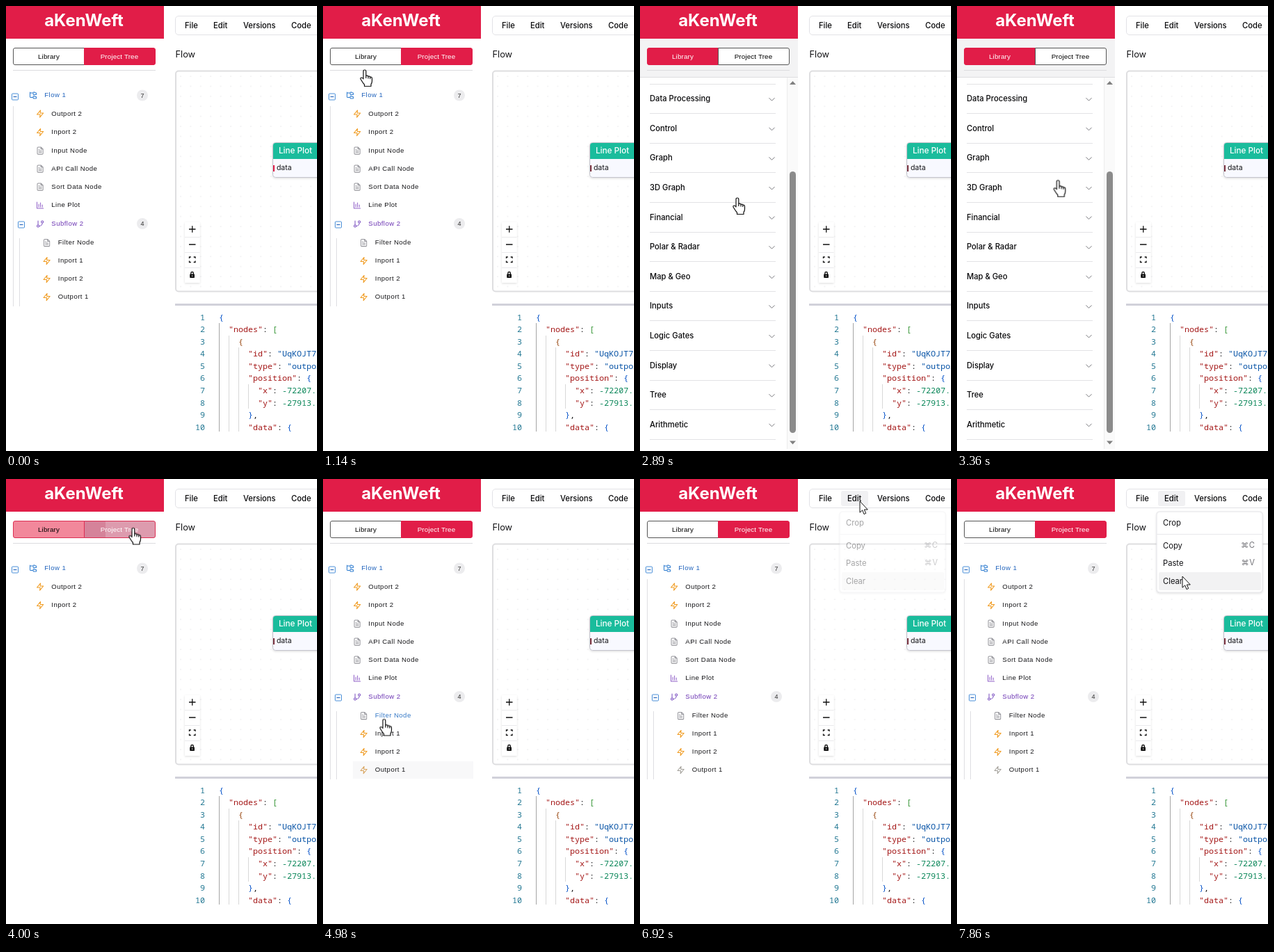
Recreate the animation shown at these times as an HTML page. Size 447x640 px, loop 8000 ms.

```html
<!DOCTYPE html>
<html lang="en">
<head>
<meta charset="utf-8">
<title>Flow editor</title>
<style>
html, body { margin: 0; width: 100%; height: 100%; overflow: hidden; background: #fff; }
svg { display: block; width: 447px; height: 640px; }
text { font: 400 11.2px Inter, sans-serif; fill: #111114; white-space: pre; }
.title { font-size: 24px; font-weight: 700; fill: #fff; text-anchor: middle; }
.head { font-size: 16px; font-weight: 600; fill: #09090b; text-anchor: middle; }
.mid { font-weight: 500; fill: #09090b; }
.hint { fill: #75757a; }
.tab { font: 9.8px "Liberation Sans", Arial, sans-serif; letter-spacing: .15px; text-anchor: middle; fill: #000; }
.row { font: 9.6px "Liberation Sans", Arial, sans-serif; letter-spacing: .45px; fill: #17171a; }
.badge { font: 9px "Liberation Sans", Arial, sans-serif; text-anchor: middle; fill: #333; }
.code { font: 500 11.67px "Noto Sans Mono", "DejaVu Sans Mono", monospace; }
.num { fill: #237893; text-anchor: end; }
.key { fill: #a31515; } .str { fill: #0451a5; } .val { fill: #098658; }
.br0 { fill: #0451c8; } .br1 { fill: #319331; } .br2 { fill: #9a4a14; }
.icon { fill: none; stroke-width: 2; stroke-linecap: round; stroke-linejoin: round; }
.short { fill: #77777c; text-anchor: end; letter-spacing: .6px; }

.a { animation: 8s linear infinite; }
.s { animation: 8s step-end infinite; }
#cursor { animation-name: move; }
#hand { animation-name: hand; }
#arrow { animation-name: arrow; }
#lib, #shade { animation-name: lib; }
#scroll { animation-name: scroll; }
#thumb { animation-name: thumb; }
#tab1 { animation-name: tab1; }
#tab2 { animation-name: tab2; }
#label1 { animation-name: label1; }
#label2 { animation-name: label2; }
#wave1 { animation-name: wave1; }
#wave2 { animation-name: wave2; }
#guides { animation-name: guides; }
#cover { animation-name: cover; }
#port { animation-name: port; }
#glow { animation-name: glow; }
#edit { animation-name: edit; }
#menu { animation-name: menu; }
.hoverFilter { animation-name: hoverFilter; }
.hoverCall { animation-name: hoverCall; }
.dim { animation-name: dim; }

@keyframes move {
  0%, 4.87% { transform: translate(150px, 640px); }
  9% { transform: translate(112px, 330px); }
  14.25% { transform: translate(60px, 92px); }
  15% { transform: translate(58px, 88px); }
  21.5%, 24.8% { transform: translate(53px, 75px); }
  27.5% { transform: translate(100px, 180px); }
  30.25%, 41.1% { transform: translate(140px, 276px); }
  48.5%, 51% { transform: translate(183px, 70.5px); }
  54.5% { transform: translate(220px, 260px); }
  58% { transform: translate(260px, 426px); }
  61% { transform: translate(112px, 418px); }
  62.2%, 63% { transform: translate(88px, 345.5px); }
  65% { transform: translate(68px, 475px); }
  67% { transform: translate(13px, 560px); }
  69% { transform: translate(100px, 596px); }
  71.75%, 74.25% { transform: translate(175px, 513px); }
  75.1% { transform: translate(160px, 235px); }
  75.85%, 76.7% { transform: translate(211px, 183.5px); }
  80% { transform: translate(285px, 75px); }
  83.75%, 91.6% { transform: translate(316px, 32px); }
  94.9%, 96.6% { transform: translate(324px, 135px); }
  98.2%, 100% { transform: translate(324px, 140px); }
}
@keyframes hand { 0% { opacity: 0; } 4.87% { opacity: 1; } 78.5%, 100% { opacity: 0; } }
@keyframes arrow { 0% { opacity: 0; } 78.5%, 100% { opacity: 1; } }
@keyframes lib { 0% { opacity: 0; } 22.6% { opacity: 1; } 49.2%, 100% { opacity: 0; } }
@keyframes scroll {
  0%, 32.2% { transform: translateY(0); }
  33.6%, 35.4% { transform: translateY(-100px); }
  36.1%, 100% { transform: translateY(-172px); }
}
@keyframes thumb {
  0%, 32.2% { transform: translateY(0); }
  33.6%, 35.4% { transform: translateY(69px); }
  36.1%, 100% { transform: translateY(118px); }
}
@keyframes tab1 {
  0%, 22.5% { fill: #fff; stroke: #555; }
  23.5%, 24.3% { fill: #d9718c; stroke: #d02850; }
  25.25%, 48.8% { fill: #e11d48; stroke: #e11d48; }
  50%, 50.8% { fill: #f2889b; stroke: #dc3054; }
  52.6%, 100% { fill: #fff; stroke: #555; }
}
@keyframes tab2 {
  0%, 22.5% { fill: #e11d48; stroke: #e11d48; }
  23.5%, 24.3% { fill: #f8bfcc; stroke: #9c4a5c; }
  25.25%, 48.8% { fill: #fff; stroke: #555; }
  50%, 50.8% { fill: #dd9bae; stroke: #dc3054; }
  52.6%, 100% { fill: #e11d48; stroke: #e11d48; }
}
@keyframes label1 { 0% { fill: #000; } 23% { fill: #fff; } 49.8%, 100% { fill: #000; } }
@keyframes label2 { 0% { fill: #fff; } 23% { fill: #000; } 49.8%, 100% { fill: #fff; } }
@keyframes wave1 { 0% { opacity: 0; } 23.4% { opacity: 1; } 24.4%, 100% { opacity: 0; } }
@keyframes wave2 { 0% { opacity: 0; } 49.9% { opacity: 1; } 50.9%, 100% { opacity: 0; } }
@keyframes guides { 0% { opacity: 1; } 49% { opacity: 0; } 51.75%, 100% { opacity: 1; } }
@keyframes cover {
  0% { transform: translateY(640px); }
  49% { transform: translateY(194px); }
  50.87% { transform: translateY(273px); }
  51.75% { transform: translateY(352px); }
  52.6%, 100% { transform: translateY(640px); }
}
@keyframes port { 0% { fill: #e11d48; } 12%, 100% { fill: #7c3440; } }
@keyframes glow { 0%, 60.4% { opacity: 0; } 61% { opacity: 1; } 62.2%, 63% { opacity: .6; } 64%, 100% { opacity: 0; } }
@keyframes hoverFilter { 0%, 61.4% { fill: #17171a; } 62.2%, 63.2% { fill: #3478c6; } 65%, 100% { fill: #17171a; } }
@keyframes hoverCall { 0%, 74.6% { fill: #17171a; } 75.2%, 76.6% { fill: #2577d0; } 78.5%, 100% { fill: #17171a; } }
@keyframes dim { 0%, 60.8% { stroke: #f09a1e; } 62.2%, 63% { stroke: #d8a35c; } 64.5%, 100% { stroke: #a3a09a; } }
@keyframes edit { 0% { opacity: 0; } 85.6%, 100% { opacity: 1; } }
@keyframes menu { 0%, 85.6% { opacity: 0; } 88%, 100% { opacity: 1; } }
</style>
</head>
<body>
<svg viewBox="0 0 447 640" xmlns="http://www.w3.org/2000/svg">
  <defs>
    <pattern id="dots" x="250" y="100" width="14.4" height="14.4" patternUnits="userSpaceOnUse">
      <circle cx="1" cy="1" r=".6" fill="#d4d4d8"/>
    </pattern>
    <filter id="soft" x="-20%" y="-20%" width="140%" height="150%">
      <feDropShadow dx="0" dy="1.2" stdDeviation="1.6" flood-opacity=".13"/>
    </filter>
    <clipPath id="view"><rect y="103" width="227" height="534"/></clipPath>
    <clipPath id="editor"><rect x="243" y="436" width="204" height="176"/></clipPath>
  </defs>

  <!-- sidebar -->
  <rect width="227" height="47" fill="#e11d48"/>
  <rect id="shade" class="s" y="47" width="227" height="55" fill="#f3f3f4"/>
  <path d="M10 92.5H215" stroke="#dcdcdf"/>
  <path id="tab1" class="a" d="M112.5 60.5H13a2.5 2.5 0 0 0-2.5 2.5V82a2.5 2.5 0 0 0 2.5 2.5H112.5Z"/>
  <path id="tab2" class="a" d="M112.5 60.5H212a2.5 2.5 0 0 1 2.5 2.5V82a2.5 2.5 0 0 1-2.5 2.5H112.5Z"/>
  <rect id="wave1" class="s" x="99" y="61" width="13" height="23" fill="#cf4f6e"/>
  <rect id="wave2" class="s" x="113" y="61" width="30" height="23" fill="#d5839a"/>
  <g id="side"></g>
  <g id="guides" class="s" stroke="#dedee2"><path d="M10.5 144V432M19.5 334V432"/></g>
  <rect id="glow" class="a" x="43" y="406" width="173" height="25" fill="#f4f4f5"/>
  <g id="tree"></g>
  <rect id="cover" class="s" width="227" height="640" fill="#fff"/>

  <g id="lib" class="s">
    <rect y="102" width="227" height="535" fill="#fff"/>
    <path d="M0 102.5H227" stroke="#dedee0"/>
    <g clip-path="url(#view)"><g id="scroll" class="a">
      <rect x="14.5" y="161.5" width="180" height="28" rx="4" fill="#fff" stroke="#dfdfe3"/>
    </g></g>
    <rect x="211" y="103" width="16" height="534" fill="#fafafa"/>
    <path d="M211.5 103V637" stroke="#ececec"/>
    <rect id="thumb" class="a" x="215" y="120" width="9" height="376" rx="4.5" fill="#8b8b8b"/>
    <path d="M215 113L219.5 108 224 113ZM215 625.5L219.5 630.5 224 625.5Z" fill="#808080"/>
  </g>

  <!-- canvas -->
  <rect x="243.5" y="14.5" width="240" height="27" rx="4.5" fill="#fff" stroke="#e2e2e6"/>
  <rect id="edit" class="s" x="289" y="17" width="39" height="22" rx="3" fill="#f1f1f3"/>
  <rect x="244" y="93.5" width="240" height="317" rx="4" fill="#fff" stroke="#dedee0" stroke-width="2"/>
  <rect x="246" y="96" width="201" height="313" fill="url(#dots)"/>
  <g filter="url(#soft)"><rect x="383.5" y="196.5" width="100" height="50" rx="4" fill="#f8f9ff" stroke="#c4c4cc"/></g>
  <path d="M384 220V200.5a3.5 3.5 0 0 1 3.5-3.5H447V220Z" fill="#1abc9c"/>
  <rect id="port" class="s" x="384" y="229" width="2" height="9"/>
  <g filter="url(#soft)"><rect x="257" y="311" width="21.5" height="87" fill="#fff"/></g>
  <path d="M257 332.5H278.5M257 354.5H278.5M257 376.5H278.5" stroke="#eaeaec"/>
  <g fill="none" stroke="#111" stroke-width="1.3">
    <path d="M263 321H272.5M267.75 316.25V325.75M263 343H272.5"/>
    <path d="M263.5 363V361H265.8M269.7 361H272V363M272 366.5V368.5H269.7M265.8 368.5H263.5V366.5"/>
    <path d="M265.8 386V384.3a1.8 1.8 0 0 1 3.6 0V386"/>
  </g>
  <rect x="264.2" y="385.5" width="6.8" height="5.5" rx=".8" fill="#111"/>
  <rect x="267.1" y="387.5" width="1" height="1.5" fill="#fff"/>
  <rect x="243" y="428" width="204" height="3" fill="#d1d1da"/>
  <g id="code" clip-path="url(#editor)">
    <path d="M306.5 456V612" stroke="#a4a4a4"/>
    <path d="M320.5 474V612M334.5 491V612M348.5 544V579" stroke="#d8d8d8"/>
  </g>
  <g id="main"></g>

  <g id="menu" class="a">
    <g filter="url(#soft)"><rect x="287" y="47" width="152" height="116" rx="4" fill="#fff" stroke="#e2e2e6"/></g>
    <path d="M287 79.5H439" stroke="#e8e8ea"/>
    <rect x="290" y="134" width="147" height="26" rx="2.5" fill="#f2f2f3"/>
  </g>

  <g id="cursor" class="a" stroke="#111" stroke-linejoin="round">
    <g id="hand" class="s" stroke-width="1.2">
      <path fill="#fff" d="M-2 2Q-2 0 0 0Q1.8 0 1.8 2V8.5Q4 7.5 5 9.3Q7 8.6 7.8 10.2Q10.5 9.8 10.5 12.5V16Q10.5 19 9 20.5V23.5H-.5V21Q-2.5 19-4.5 15.5L-6 13Q-6.5 11-4.5 11Q-3 11.3-2 13Z"/>
      <path fill="none" d="M1.8 8.5V12M5 9.3V12.5M7.8 10.2V13"/>
    </g>
    <path id="arrow" class="s" fill="#fff" d="M0 0V16.2L3.7 12.8 6 18.6 8.7 17.4 6.3 12H11.3Z"/>
  </g>
</svg>
<script>
const NS = 'http://www.w3.org/2000/svg';
const $ = id => document.getElementById(id);

function add(parent, tag, attrs, content) {
  const el = document.createElementNS(NS, tag);
  for (const k in attrs) el.setAttribute(k, attrs[k]);
  if (content) el.textContent = content;
  parent.appendChild(el);
  return el;
}
// y is the middle of the capitals
const text = (parent, x, y, content, cls = '', more = {}) =>
  add(parent, 'text', { x, y, dy: '.36em', class: cls, ...more }, content);

const ICONS = {
  flow: ['#2f7dd0', 'M20 10a1 1 0 0 0 1-1V6a1 1 0 0 0-1-1h-2.5L16 3h-3a1 1 0 0 0-1 1v5a1 1 0 0 0 1 1zM20 21a1 1 0 0 0 1-1v-3a1 1 0 0 0-1-1h-2.9L16 14h-3a1 1 0 0 0-1 1v5a1 1 0 0 0 1 1zM3 5h7M3 3v13a2 2 0 0 0 2 2h5'],
  zap: ['#f09a1e', 'M13 2L3 14h9l-1 8 10-12h-9z'],
  file: ['#96969c', 'M14 2H6a2 2 0 0 0-2 2v16a2 2 0 0 0 2 2h12a2 2 0 0 0 2-2V8zM14 2v6h6M16 13H8M16 17H8M10 9H8'],
  plot: ['#9262c8', 'M3 3v18h18M8 17V9M13 17V5M18 17v-6'],
  branch: ['#7a4fc0', 'M6 3v12M18 9a9 9 0 0 1-9 9M21 6a3 3 0 1 1-6 0a3 3 0 1 1 6 0M9 18a3 3 0 1 1-6 0a3 3 0 1 1 6 0']
};

// icon, label, left edge of the icon, middle, text colour class
const ROWS = [
  ['flow', 'Flow 1', 33, 128], ['zap', 'Outport 2', 43, 154.5], ['zap', 'Inport 2', 43, 181],
  ['file', 'Input Node', 43, 207.5], ['file', 'API Call Node', 43, 233.5, 'a hoverCall'],
  ['file', 'Sort Data Node', 43, 259.5], ['plot', 'Line Plot', 43, 286], ['branch', 'Subflow 2', 43, 313],
  ['file', 'Filter Node', 52.5, 340, 'a hoverFilter'], ['zap', 'Inport 1', 52.5, 366],
  ['zap', 'Inport 2', 52.5, 392], ['zap', 'Outport 1', 52.5, 418]
];
const tree = $('tree');
const TINT = { flow: '#2365bd', branch: '#6c35b3' };
ROWS.forEach(([icon, label, x, y, cls = ''], i) => {
  const [stroke, d] = ICONS[icon];
  add(tree, 'path', {
    d, stroke, class: 'icon' + (i === ROWS.length - 1 ? ' a dim' : ''),
    transform: `translate(${x} ${y - 5.6}) scale(.51)`
  });
  const t = text(tree, x + 22.3, y, label, 'row ' + cls);
  if (TINT[icon]) t.style.fill = TINT[icon];
});
for (const [x, y, badgeY, n] of [[8.5, 126, 128.5, '7'], [17.5, 310, 313, '4']]) {
  add(tree, 'rect', { x, y, width: 9, height: 9, rx: 1, fill: '#fff', stroke: '#4a8fd8' });
  add(tree, 'path', { d: `M${x + 2} ${y + 4.5}h5`, stroke: '#2a68bd', 'stroke-width': 1.2 });
  add(tree, 'circle', { cx: 196, cy: badgeY, r: 8, fill: '#ececee' });
  text(tree, 196, badgeY, n, 'badge');
}

const side = $('side');
text(side, 112, 20.5, 'aKenWeft', 'title');
text(side, 61.5, 72, 'Library', 'tab s', { id: 'label1' });
text(side, 163, 72, 'Project Tree', 'tab s', { id: 'label2' });

const list = $('scroll');
text(list, 105, 125, 'Blocks', 'head');
text(list, 24, 175.5, 'Search For block', 'hint');
['Basic Nodes', 'Network', 'Data Processing', 'Control', 'Graph', '3D Graph', 'Financial', 'Polar & Radar',
  'Map & Geo', 'Inputs', 'Logic Gates', 'Display', 'Tree', 'Arithmetic'].forEach((name, i) => {
  const y = 220 + 42.6 * i;
  text(list, 14, y, name, 'mid');
  add(list, 'path', { d: `M185.5 ${y - 1}l4 4 4-4`, fill: 'none', stroke: '#77777c' });
  add(list, 'path', { d: `M14 ${Math.round(y + 21) + .5}H195`, stroke: '#e2e2e5' });
});

const main = $('main');
[['File', 257], ['Edit', 298], ['Versions', 341], ['Code', 410]].forEach(([s, x]) => text(main, x, 28, s, 'mid'));
text(main, 243.5, 69.5, 'Flow', '', { style: 'font-size:12.8px' });
text(main, 392, 208, 'Line Plot', '', { style: 'font-size:11.7px;font-weight:500;fill:#fff' });
text(main, 389, 232.5, 'data', '', { style: 'font-size:10.4px' });

const menu = $('menu');
[['Crop', 63], ['Copy', 96, '⌘C'], ['Paste', 121, '⌘V'], ['Clear', 147]].forEach(([s, y, keys]) => {
  text(menu, 296, y, s);
  if (keys) text(menu, 428.5, y - 1.5, keys, 'short');
});

const code = $('code');
const LINES = [[0, '{'], [1, '"nodes": ['], [2, '{'], [3, '"id": "UqKOJT7'], [3, '"type": "outport",'], [3, '"position": {'],
  [4, '"x": -72207.'], [4, '"y": -27913.'], [3, '},'], [3, '"data": {']];
// brackets cycle through three colours with depth
const kind = (s, depth) => s[0] === '"' ? 'str' : /\d/.test(s) ? 'val' : /[{}[\]]/.test(s) ? 'br' + depth % 3 : '';
LINES.forEach(([depth, line], i) => {
  const y = 447.5 + 17.55 * i;
  text(code, 286, y, String(i + 1), 'code num');
  const row = text(code, 306 + 14 * depth, y, '', 'code');
  line.match(/"[^"]*"?|-?[\d.]+|[{}[\]]|[:, ]+/g).forEach((s, n) =>
    add(row, 'tspan', { class: n === 0 && s[0] === '"' ? 'key' : kind(s, depth) }, s));
});
</script>
</body>
</html>
```
